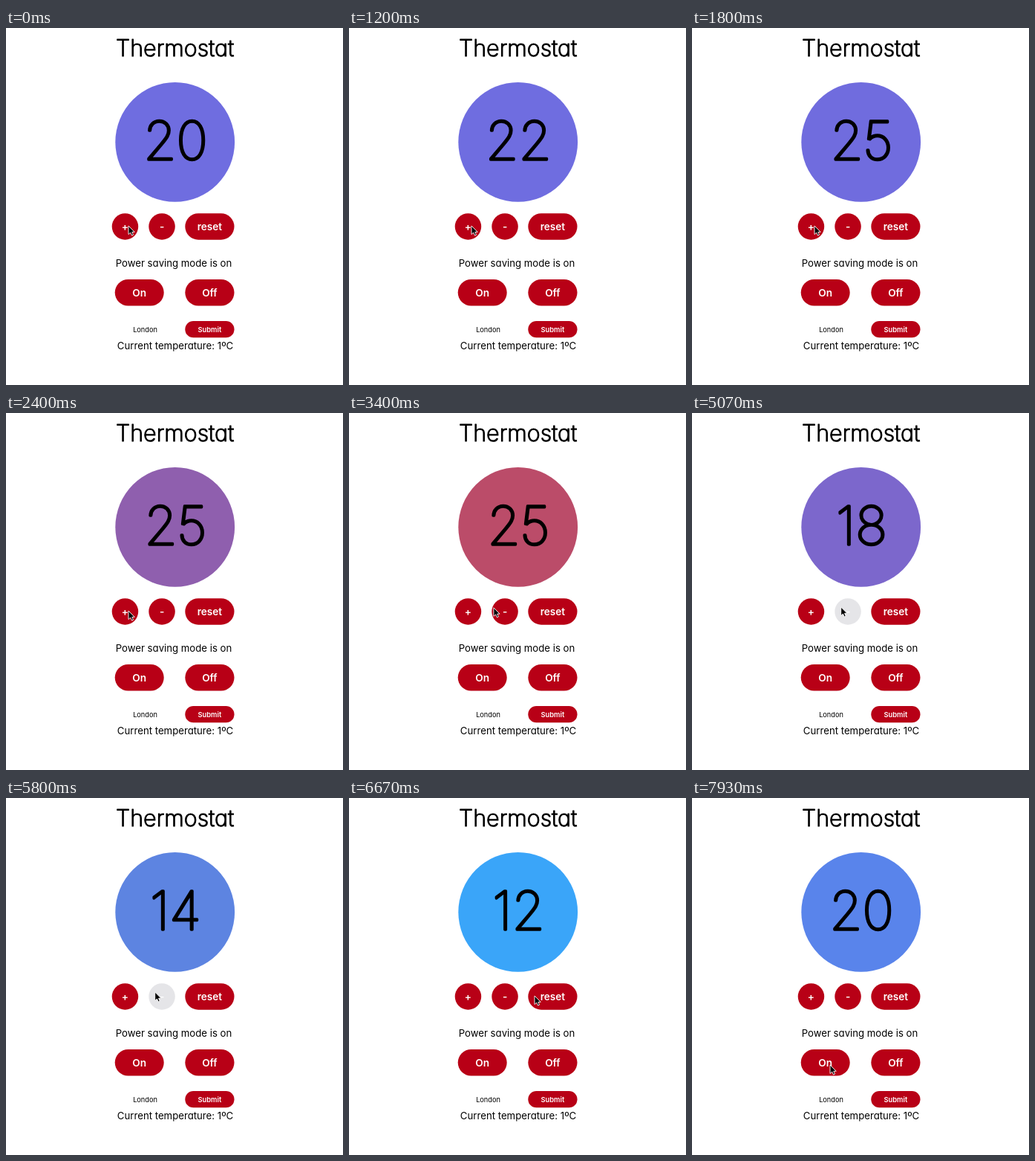
These frames come from a looping animation (454x480 px, 8 s). An HTML page:

```html
<!DOCTYPE html>
<html lang="en">
<head>
<meta charset="utf-8">
<title>Thermostat</title>
<style>
html, body { margin: 0; width: 100%; height: 100%; overflow: hidden; background: #fff; }
svg { display: block; width: 454px; height: 480px; }
text {
  font-family: Inter, "Open Sans", sans-serif;
  font-feature-settings: "cv11";
  text-anchor: middle;
  stroke-linejoin: round;
}
/* Thin weights with a round outline give soft stroke ends */
.title { font-size: 30.5px; font-weight: 200; stroke: #000; stroke-width: 1.2; }
.digits { font-size: 71.5px; font-weight: 100; stroke: #000; stroke-width: 3.4; }
.line { font-size: 13.2px; }
.city { font-size: 9.2px; }
rect { fill: #b80016; }
.label { fill: #fff; font-size: 13.6px; font-weight: 600; }
.small { font-size: 9.3px; }
.pressed rect { fill: #e5e5e8; }
</style>
</head>
<body>
<svg viewBox="0 0 454 480">
  <text class="title" x="227.7" y="38.2">Thermostat</text>
  <circle id="dial" cx="227.7" cy="153.4" r="80.4"/>
  <text class="digits" id="digits" x="228.5" y="177">20</text>
  <g id="buttons"></g>
  <text class="line" x="226" y="320.5">Power saving mode is on</text>
  <text class="city" x="187.5" y="409">London</text>
  <text class="line" x="228" y="431.5">Current temperature: 1ºC</text>
  <path id="cursor" d="M0 0V11.5L2.7 9.1 4.5 13 6.5 12.1 4.8 8.3H8.2Z" stroke="#fff" stroke-width=".9"/>
</svg>
<script>
const LOOP = 8000;
const $ = id => document.getElementById(id);

function addButton(label, x, y, w, h, small = "") {
  $("buttons").insertAdjacentHTML("beforeend",
    `<g><rect x="${x}" y="${y}" width="${w}" height="${h}" rx="${h / 2}"/>
     <text class="label ${small}" x="${x + w / 2}" y="${y + h / 2 + (small ? 3.4 : 4.9)}">${label}</text></g>`);
  return $("buttons").lastElementChild;
}
const plus = addButton("+", 142.7, 249.2, 35.5, 35.5);
const minus = addButton("-", 192.3, 249.2, 35.5, 35.5);
const reset = addButton("reset", 241.3, 249.2, 66.2, 35.5);
addButton("On", 146.7, 338, 66, 35.5);
addButton("Off", 241.3, 338, 66.2, 35.5);
addButton("Submit", 241.3, 394, 66.2, 22.3, "small");

// Each click: release time, button, resulting temperature
const clicks = [600, 1110, 1360, 1540, 1720].map((time, i) => ({ time, button: plus, temp: 21 + i }));
for (let i = 0; i < 13; i++) clicks.push({ time: 3620 + 208 * i, button: minus, temp: 24 - i });
clicks.push({ time: 6870, button: reset, temp: 20 });
const HOLD = 115;

// CSS "ease": cubic-bezier(.25, .1, .25, 1)
function ease(x) {
  if (x <= 0) return 0;
  if (x >= 1) return 1;
  const bezier = (a, b, s) => 3 * a * s * (1 - s) ** 2 + 3 * b * s * s * (1 - s) + s ** 3;
  let lo = 0, hi = 1;
  for (let i = 0; i < 20; i++) {
    const mid = (lo + hi) / 2;
    if (bezier(.25, .25, mid) < x) lo = mid; else hi = mid;
  }
  return bezier(.1, 1, lo);
}
const mix = (a, b, k) => a.map((v, i) => v + (b[i] - v) * k);

// Dial fades: an interrupted fade continues from the colour it had reached
const medium = [111, 109, 224], high = [200, 70, 85], low = [45, 178, 258];
const fades = [
  { start: 1720, to: high, length: 3000 },
  { start: 3620, to: medium, length: 2690 },
  { start: 5076, to: low, length: 3000 },
  { start: 6870, to: medium, length: 3000 }
];
function dialColour(t) {
  let colour = medium;
  fades.forEach(({ start, to, length }, i) => {
    const end = Math.min(t, fades[i + 1]?.start ?? LOOP);
    colour = mix(colour, to, ease((end - start) / length));
  });
  return `rgb(${colour.map(v => Math.min(255, Math.round(v)))})`;
}

const moves = [
  { start: 3200, end: 3470, to: [200.7, 261] },
  { start: 6200, end: 6600, to: [250, 266] },
  { start: 6950, end: 7630, to: [186, 359] }
];
function cursorAt(t) {
  let point = [165, 266];
  for (const { start, end, to } of moves) {
    const k = Math.max(0, Math.min(1, (t - start) / (end - start)));
    point = mix(point, to, k * k * (3 - 2 * k));
  }
  return point;
}

function draw() {
  const t = performance.now() % LOOP;
  const done = clicks.filter(c => c.time <= t);
  $("digits").textContent = done.length ? done[done.length - 1].temp : 20;
  $("dial").setAttribute("fill", dialColour(t));
  $("cursor").setAttribute("transform", `translate(${cursorAt(t)})`);
  for (const button of [plus, minus, reset]) {
    const held = clicks.some(c => c.button === button && t >= c.time - HOLD && t < c.time);
    button.classList.toggle("pressed", held);
  }
  requestAnimationFrame(draw);
}
draw();
</script>
</body>
</html>
```
